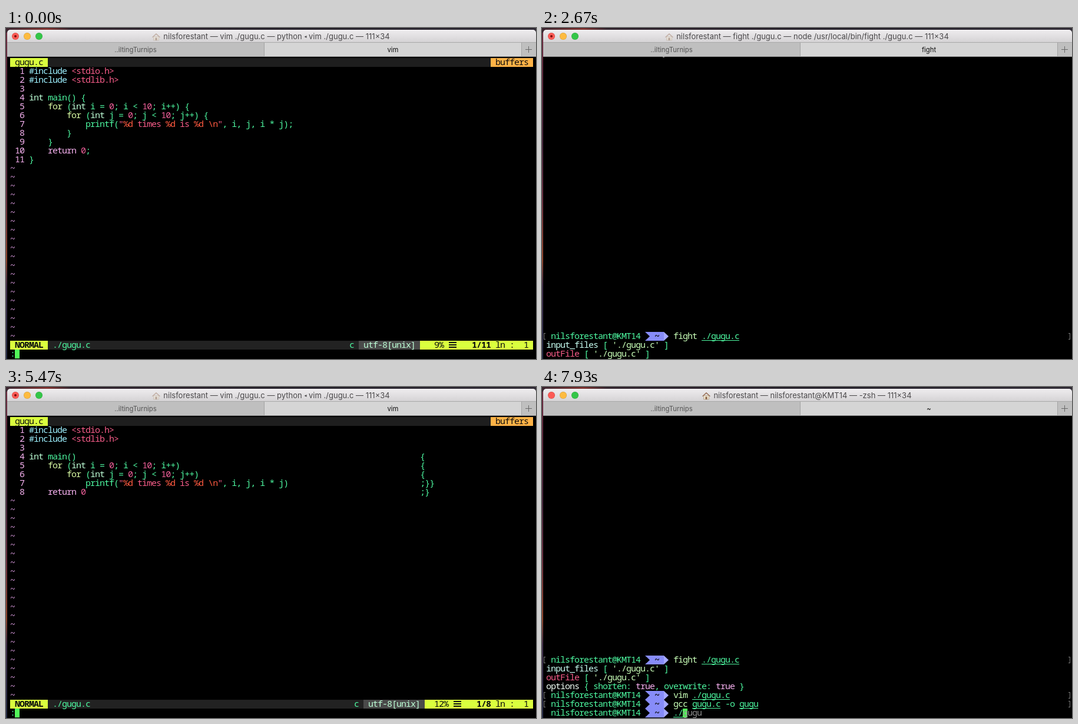
An HTML page that plays this animation: 900x562 px, repeating every 8 s.

```html
<!DOCTYPE html>
<html lang="en">
<head>
<meta charset="utf-8">
<title>Terminal session</title>
<style>
html, body { margin: 0; width: 100%; height: 100%; overflow: hidden; background: #000; }
#stage {
  position: relative; width: 900px; height: 562px; overflow: hidden;
  background:
    linear-gradient(90deg, #39242f, #7d2f2c 70px, #30222c 110px, #242029 50%, #2f2a34) 0 0 / 100% 8px no-repeat,
    linear-gradient(#6b2a3c, #46263c 35%, #6a3040 52%, #8f452c 70%, #42304c 78%, #252a45);
}
#stage div, #stage p, #stage svg { position: absolute; }
#window { left: 2px; top: 3px; width: 898px; height: 559px; background: #000; border-radius: 5px 5px 0 0; }
#bar {
  left: 2px; top: 3px; width: 898px; height: 22px; border-radius: 5px 5px 0 0;
  background: linear-gradient(#efedef, #d5d3d5); border-bottom: 1px solid #a9a9a9; box-sizing: border-box;
}
.light { top: 8px; width: 12px; height: 12px; border-radius: 50%; box-shadow: inset 0 0 0 .5px #0003; }
.busy #close::after {
  content: ""; position: absolute; left: 4px; top: 4px; width: 4px; height: 4px; border-radius: 50%; background: #7a0d0a;
}
#title {
  left: 0; top: 4px; width: 900px; height: 21px; display: flex; align-items: center; justify-content: center;
  font: 13px/21px Inter, Roboto, sans-serif; color: #4b494b; white-space: pre;
}
#title small { font-size: 8px; vertical-align: 2px; }
#stage #title svg { position: static; margin-right: 5px; }
.busy #title svg { opacity: .45; }
.tab {
  top: 25px; height: 23px; border-bottom: 1px solid #999; text-align: center;
  font: 11.3px/24px Inter, Roboto, sans-serif; color: #555; background: #bfbfbf;
}
#tab { color: #111; background: #d5d5d5; }
#screen { left: 0; top: 0; width: 900px; height: 562px; }
#screen p {
  margin: 0; white-space: pre; color: #4df7a0; letter-spacing: -1px;
  font: 500 15px/15px "Noto Sans Mono", "DejaVu Sans Mono", monospace;
}
#screen i { font-style: normal; }
#screen .path { text-decoration: underline 1px; text-underline-offset: 2px; text-decoration-skip-ink: none; }
.cmd, .quoted { color: #c9ffb8; }
.hint { color: #8c8c8c; }
.key { color: #c8fff2; }
.rose, .str { color: #f55c88; }
.white { color: #f2fff6; }
.num { color: #f0609a; }
.fmt { color: #ff5a40; }
.inc { color: #9df0ff; }
.type { color: #bdffd6; }
.loop { color: #dcffa6; }
.ret, .bool, .line { color: #f9b2f2; }
.tilde { color: #d99ade; }
.ink { color: #0c0c0c; }
.bold { font-weight: 700; }
.mark { width: 2px; height: 9px; border: 1px solid #777; }
</style>
</head>
<body>
<div id="stage">
  <div id="window"></div>
  <div id="bar"></div>
  <div class="light" id="close" style="left:10px;background:#fc5a55"></div>
  <div class="light" style="left:30px;background:#fdbb40"></div>
  <div class="light" style="left:50px;background:#34c648"></div>
  <div id="title">
    <svg width="14" height="14" viewBox="0 0 14 14"><path d="M2.5 6.5h9V13h-9z" fill="#efe3cd" stroke="#a08a70" stroke-width=".6"/><path d="M5.5 8.5h3V13h-3z" fill="#8b6549"/><path d="M0 7.5 7 1l7 6.5-1 .8-6-5.3-6 5.3z" fill="#94694f"/></svg><span id="caption"></span>
  </div>
  <div class="tab" style="left:2px;width:436px">..iltingTurnips</div>
  <div class="tab" id="tab" style="left:438px;width:436px;border-left:1px solid #a3a3a3"></div>
  <div class="tab" style="left:875px;width:25px;border-left:1px solid #a3a3a3"></div>
  <svg style="left:882px;top:31px" width="11" height="11"><path d="M5.5 0v11M0 5.5h11" stroke="#686868"/></svg>
  <div id="screen"></div>
</div>
<script>
const LOOP = 8000, ROWS = 34;
const USER = 'nilsforestant', HOST = USER + '@KMT14';
const LIME = '#daff3e', GREEN = '#52f65a';
const $ = id => document.getElementById(id);

const colX = col => 7 + col * 8;
const rowY = row => 51 + row * 15;
const escapeHtml = s => s.replace(/&/g, '&amp;').replace(/</g, '&lt;');
const span = (cls, s) => `<i class="${cls}">${escapeHtml(s)}</i>`;
const text = (row, col, html) => `<p style="left:${colX(col)}px;top:${rowY(row) - 1}px">${html}</p>`;
const rect = (x, y, w, h, color) =>
  `<div style="left:${x}px;top:${y}px;width:${w}px;height:${h}px;background:${color}"></div>`;
const cells = (row, col, n, color) => rect(colX(col), rowY(row), n * 8, 15, color);
const cursor = (row, col) => cells(row, col, 1, GREEN);

// Shell
const ran = cmd => ({ cmd, done: true });
const live = (cmd, hint = '') => ({ cmd, hint });

function paintCommand(cmd) {
  return cmd.split(' ').map((word, i) =>
    /^\./.test(word) || (i && /^g/.test(word)) ? span('path', word)
      : i ? word : span('cmd', word)).join(' ');
}

function promptLine(row, { cmd, hint, done }) {
  const y = rowY(row);
  const brackets = done
    ? `<div class="mark" style="left:3px;top:${y + 2}px;border-right:0"></div>
       <div class="mark" style="left:894px;top:${y + 2}px;border-left:0"></div>` : '';
  return brackets + text(row, 1, HOST) +
    `<svg style="left:175px;top:${y}px" width="40" height="15">
      <path d="M0 0H32V15H0L8 7.5z" fill="#878cf9"/><path d="M32 0 40 7.5 32 15z" fill="#a5a9ff"/></svg>` +
    text(row, 23, span('ink bold', '~')) +
    (done ? '' : cursor(row, 27 + cmd.length)) +
    text(row, 27, paintCommand(cmd) + (hint ? span('hint', hint) : ''));
}

function shell(lines, tab = '~', caption = HOST + ' — -zsh', showCursor = true) {
  const shown = lines.slice(-ROWS), first = ROWS - shown.length;
  const html = shown.map((line, i) => {
    const row = first + i;
    if (line.cmd !== undefined) return promptLine(row, line);
    if (line) return text(row, 0, line);
    return showCursor && row === ROWS - 1 ? cursor(row, 0) : '';
  }).join('');
  return { tab, caption, html };
}

// Editor
const EDIT = 'vim ./gugu.c';
const EDIT_START = `${EDIT} — ${EDIT}`;
const EDIT_BUSY = `${EDIT} — python <small>◂</small> ${EDIT}`;
const TOKENS = /(#include)|(<\w+\.h>)|("[^"]*")|\b(int)\b|\b(for)\b|\b(return)\b|\b(\d+)\b/g;
const CLASSES = ['inc', 'str', 'quote', 'type', 'loop', 'ret', 'num'];

function highlight(code) {
  return code.replace(TOKENS, (token, ...groups) => {
    const cls = CLASSES[groups.findIndex(Boolean)];
    if (cls !== 'quote') return span(cls, token);
    return token.split(/(%d|\\n)/).map((s, i) => span(i % 2 ? 'fmt' : 'str', s)).join('');
  });
}

const head = ['#include <stdio.h>', '#include <stdlib.h>', ''];
const body = [
  'int main()',
  '    for (int i = 0; i < 10; i++)',
  '        for (int j = 0; j < 10; j++)',
  '            printf("%d times %d is %d \\n", i, j, i * j)',
  '    return 0'
];
const plain = [
  ...head, ...body.slice(0, 3).map(s => s + ' {'), body[3] + ';',
  '        }', '    }', body[4] + ';', '}'
];
const tails = ['{', '{', '{', ';}}', ';}'];
const shifted = [...head, ...body.map((s, i) => s.padEnd(83) + tails[i])];

function vim(code, command, caption = EDIT_BUSY) {
  const total = code.length, percent = Math.floor(100 / total) + '%';
  const place = '1/' + total, status = ROWS - 2;
  const start = 91 - place.length, menu = 91 + percent.length;
  let html = cells(0, 0, 111, '#1e1e1e') + cells(0, 0, 8, LIME) + cells(0, 102, 9, '#ffb347') +
    text(0, 1, span('ink', 'gugu.c')) + text(0, 103, span('ink', 'buffers'));

  const typing = command[0] === ':';
  html += typing ? cursor(ROWS - 1, command.length) : cursor(1, 4);
  for (let row = 1; row < status; row++) {
    html += row > total ? text(row, 0, span('tilde', '~'))
      : text(row, 0, span('line', String(row).padStart(3)) + ' ' + highlight(code[row - 1]));
  }

  html += cells(status, 0, 111, '#222') + cells(status, 0, 8, LIME) +
    cells(status, start - 13, 13, '#4a4a4a') + cells(status, start, 111 - start, LIME) +
    text(status, 1, span('ink bold', 'NORMAL')) + text(status, 9, './gugu.c') +
    text(status, start - 15, 'c') + text(status, start - 12, span('type', 'utf-8[unix]')) +
    text(status, 90, span('ink', percent)) +
    [2, 6, 10].map(dy => rect(colX(menu) + 1, rowY(status) + dy, 13, 2, '#111')).join('') +
    text(status, 102 - place.length, span('ink bold', place)) +
    text(status, 103, span('ink', 'ln :  1')) +
    text(ROWS - 1, 0, command);
  return { tab: 'vim', caption, html };
}

// Timeline
const steps = [];
const at = (time, view) => steps.push({ time, view });
function typeCommand(start, end, history, cmd) {
  const gap = (end - start) / (cmd.length - 1);
  for (let n = 1; n <= cmd.length; n++)
    at(start + gap * (n - 1), shell([...history, live(cmd.slice(0, n), cmd.slice(n))]));
}

const FIGHT = 'fight ./gugu.c', BUILD = 'gcc gugu.c -o gugu';
const FIGHT_TITLE = `${FIGHT} — node /usr/local/bin/${FIGHT}`;
const fileList = `[ ${span('quoted', "'./gugu.c'")} ]`;
const yes = span('bool', 'true');
const output = [
  `${span('key', 'input_files')} ${fileList}`,
  `${span('rose', 'outFile')} ${fileList}`,
  `${span('white', 'options')} { shorten: ${yes}, overwrite: ${yes} }`
];
const opened = [ran(EDIT), ...Array(32).fill('')];
const fought = [...opened, ran(FIGHT)];
const printed = [...fought, ...output];
const reopened = [...printed, ran(EDIT)];
const built = [...reopened, ran(BUILD)];

at(0, vim(plain, ':'));
at(200, vim(plain, ':q'));
at(400, shell([...opened, ''], 'vim', EDIT_BUSY));
at(800, shell([...opened, live('')]));
typeCommand(1130, 2270, opened, FIGHT);
at(2400, shell([...fought, ''], 'fight', FIGHT_TITLE));
at(2660, shell([...fought, ...output.slice(0, 2)], 'fight', FIGHT_TITLE, false));
steps[steps.length - 1].view.html += rect(205, 49, 3, 1, '#999');
at(2730, shell([...printed, ''], 'fight', FIGHT_TITLE));
at(2870, shell([...printed, live('')]));
typeCommand(3130, 3930, printed, EDIT);
at(4200, shell([...reopened, ''], 'vim', EDIT_START));
at(4400, vim(shifted, '"./gugu.c" 8L, 468C', EDIT_START));
at(4870, vim(shifted, '"./gugu.c" 8L, 468C'));
at(5400, vim(shifted, ':'));
at(5530, vim(shifted, ':q'));
at(5730, shell([...reopened, ''], 'vim', EDIT_BUSY));
at(6125, shell([...reopened, live('')]));
typeCommand(6330, 7270, reopened, BUILD);
at(7400, shell([...built, ''], 'gcc', `${BUILD} — ${BUILD}`));
at(7600, shell([...built, live('')]));
at(7865, shell([...built, live('.', '/gugu')]));
at(7925, shell([...built, live('./', 'gugu')]));

let current;
function show(view) {
  if (view === current) return;
  current = view;
  $('stage').className = view.tab === '~' ? '' : 'busy';
  $('caption').innerHTML = `${USER} — ${view.caption} — 111×34`;
  $('tab').textContent = view.tab;
  $('screen').innerHTML = view.html;
}

const origin = performance.now();
function tick() {
  const t = (performance.now() - origin) % LOOP;
  show(steps.filter(step => step.time <= t).pop().view);
  requestAnimationFrame(tick);
}
tick();
</script>
</body>
</html>
```
